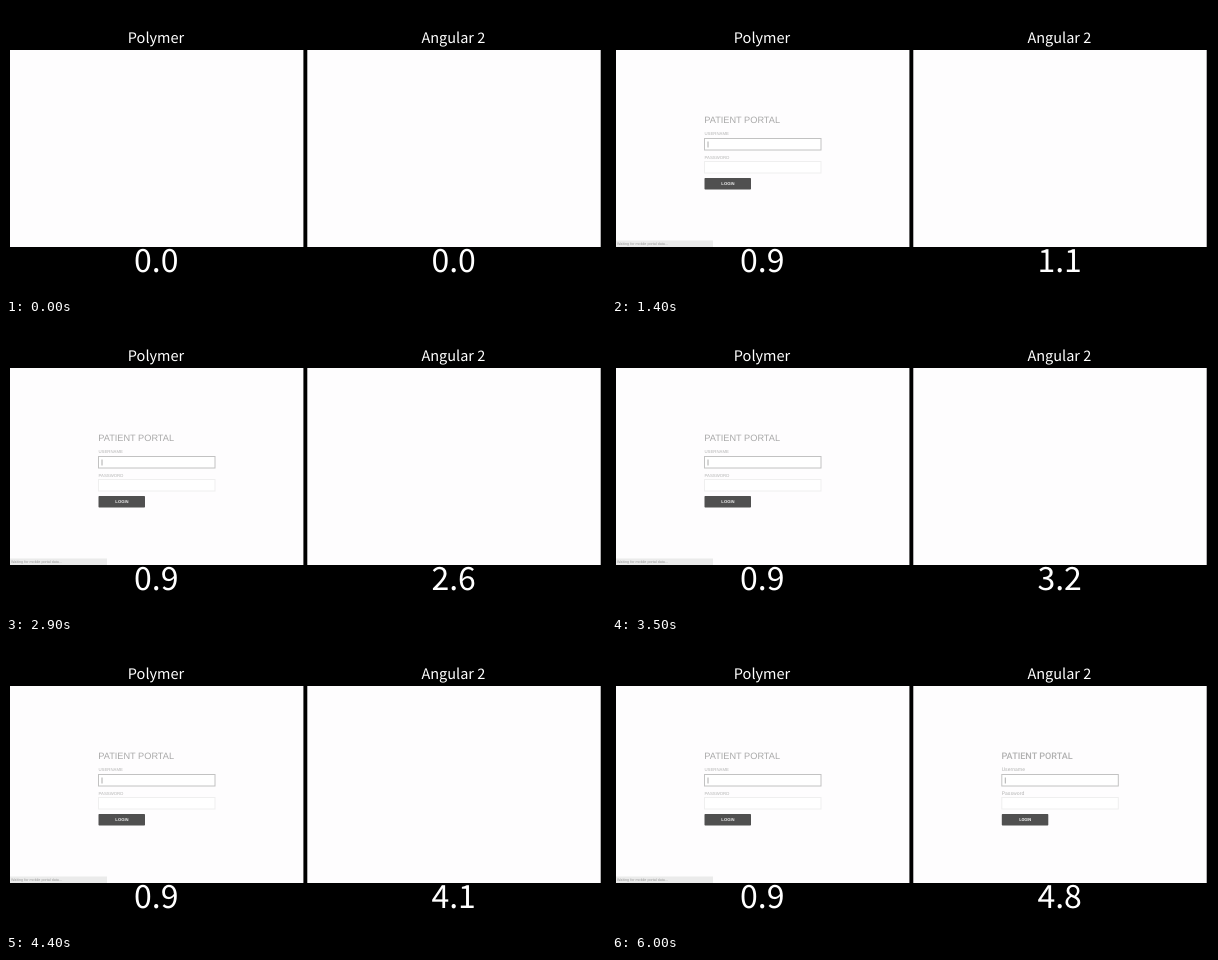
Animation of 600 by 290 pixels, one loop 6.3 s. Source, as an HTML page:

```html
<!DOCTYPE html>
<html lang="en">
<head>
<meta charset="utf-8">
<title>Load time comparison</title>
<style>
  html, body { margin: 0; width: 100%; height: 100%; overflow: hidden; background: #000; }
  svg { display: block; width: 600px; height: 290px; text-rendering: geometricPrecision; }
  .heading, .counter {
    font-family: "Noto Sans CJK JP", "Noto Sans CJK SC", "Noto Sans CJK", "Noto Sans", sans-serif;
    font-weight: 500; fill: #fff; text-anchor: middle;
  }
  .heading { font-size: 14.5px; }
  .counter { font-size: 32px; }
  .arial { font-family: "Liberation Sans", Arial, sans-serif; }
  .roboto { font-family: Roboto, sans-serif; }
  .title { font-size: 9.2px; fill: #a9a9a9; }
  .label { font-size: 4.3px; fill: #b4b4b4; }
  .roboto .title { font-size: 9.1px; font-weight: 500; fill: #b0b0b0; }
  .roboto .label { font-size: 5.1px; }
  .button { font-size: 4.2px; font-weight: bold; fill: #eee; text-anchor: middle; }
  .status { font-size: 3.7px; fill: #999; }
</style>
</head>
<body>
<svg id="stage" viewBox="0 0 600 290"></svg>
<script>
const LOOP = 6300, START = 300;

// Form coordinates are relative to the left edge of its panel.
const form = (font, userLabel, passLabel) => `
  <text class="title" x="88.3" y="116.8">PATIENT PORTAL</text>
  <text class="label" x="88.5" y="129.3">${userLabel}</text>
  <rect x="88.5" y="132.5" width="116.5" height="11.5" fill="#fff" stroke="#c2c2c2"/>
  <path d="M92 135.5v6" stroke="#999" stroke-width=".8"/>
  <text class="label" x="88.5" y="152.6">${passLabel}</text>
  <rect x="88.5" y="155.5" width="116.5" height="11.5" fill="#fff" stroke="#efefef"/>
  <rect x="88.5" y="172" width="46.5" height="11.5" rx=".7" fill="#505050"/>
  <text class="button" x="112" y="179.3">LOGIN</text>`;

const statusBar = `
  <rect x="0" y="234.5" width="97" height="6.5" fill="#ebebeb"/>
  <text class="status" x="1" y="239.3">Waiting for mobile portal data...</text>`;

const panels = [
  { x: 4, name: "Polymer", font: "arial", finish: 1200,
    content: form("arial", "USERNAME", "PASSWORD") + statusBar },
  { x: 301.3, name: "Angular 2", font: "roboto", finish: 5100,
    content: form("roboto", "Username", "Password") }
];

const stage = document.getElementById("stage");
stage.innerHTML = panels.map(p => `
  <g transform="translate(${p.x} 0)">
    <text class="heading" x="146" y="37">${p.name}</text>
    <rect y="44" width="293.4" height="197" fill="#fefdfe"/>
    <g class="page ${p.font}">${p.content}</g>
    <text class="counter" x="146.3" y="266"></text>
  </g>`).join("");

const pages = stage.querySelectorAll(".page");
const counters = stage.querySelectorAll(".counter");

function draw(now) {
  const time = now % LOOP;
  panels.forEach((p, i) => {
    const elapsed = Math.max(0, Math.min(time, p.finish) - START);
    counters[i].textContent = (Math.floor(elapsed / 100) / 10).toFixed(1);
    pages[i].style.display = time >= p.finish ? "" : "none";
  });
  requestAnimationFrame(draw);
}
draw(performance.now());
</script>
</body>
</html>
```
